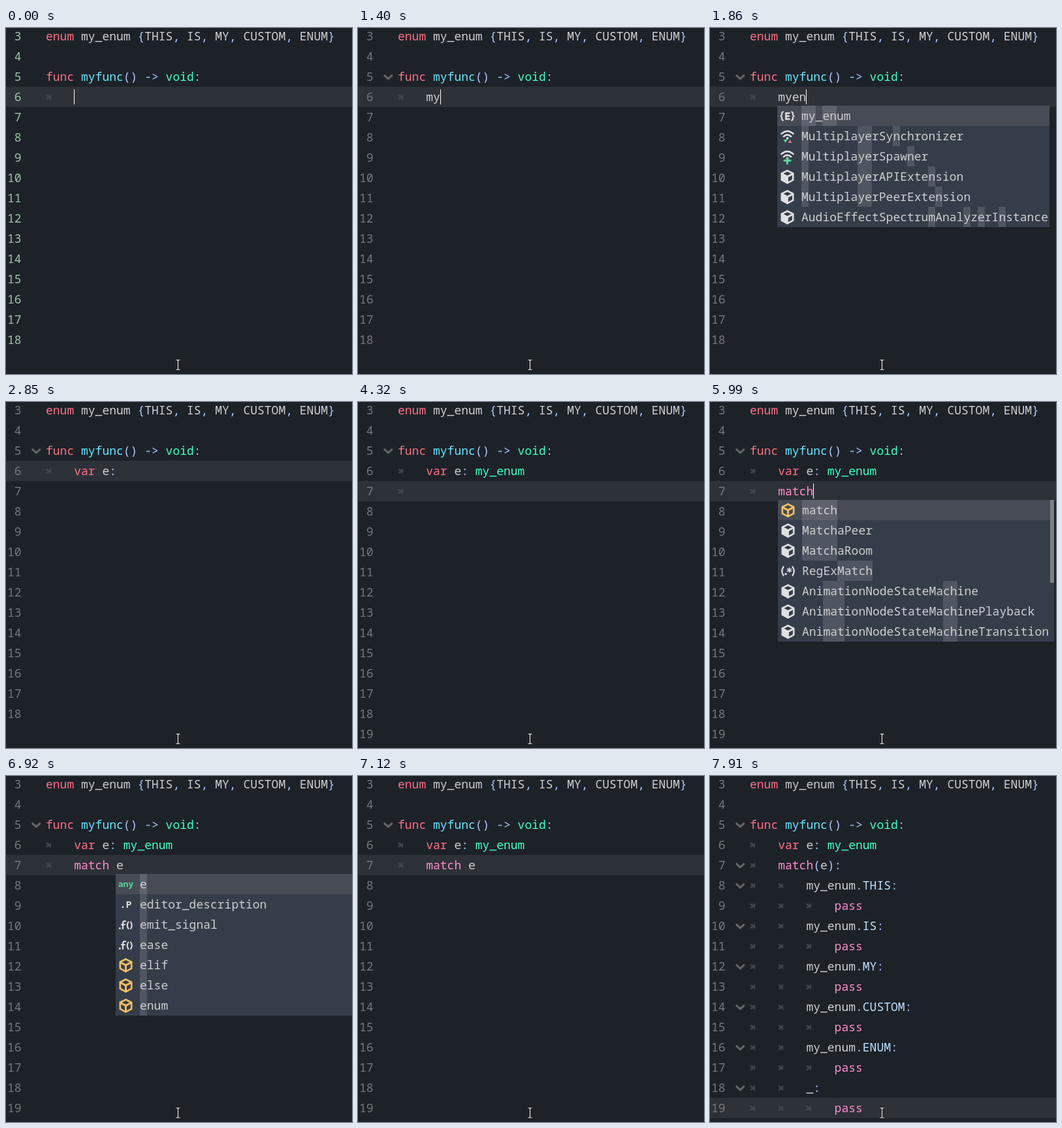
Write an HTML page with a canvas that moves like this. It is 530 px wide and 530 px high and loops after 8000 ms.

```html
<!DOCTYPE html>
<html lang="en">
<head>
<meta charset="utf-8">
<title>Code editor typing</title>
<style>
  html, body { margin: 0; width: 100%; height: 100%; overflow: hidden; background: #1d2229; }
  canvas { display: block; width: 530px; height: 530px; }
</style>
</head>
<body>
<canvas id="stage"></canvas>
<script>
const SIZE = 530, LOOP = 8000;
const CHAR = 10.8, ROW = 31, LEFT = 61, FIRST = 3;
const MONO = '"Noto Sans Mono", "DejaVu Sans Mono", monospace';
const C = {
  bg: '#1d2229', line: '#2d3138', text: '#cdcfd2', number: '#75787d', safe: '#a1c2a8',
  key: '#ff7085', flow: '#ff8ccc', func: '#66e6ff', type: '#42ffc2', symbol: '#abc9ff',
  member: '#bce0ff', tab: '#454950', fold: '#626569', list: '#363d4a', picked: '#464b56',
  match: 'rgba(255,255,255,.13)', bar: '#7b7f87', icon: '#e0e0e0', gold: '#f5c063',
  green: '#5fd79a', red: '#e0787e'
};
const WORDS = {
  enum: C.key, func: C.key, var: C.key, match: C.flow, pass: C.flow,
  myfunc: C.func, void: C.type
};

const HEAD = ['enum my_enum {THIS, IS, MY, CUSTOM, ENUM}', '', 'func myfunc() -> void:'];
const VAR = '\tvar e: my_enum';
const FULL = [VAR, '\tmatch(e):'];
for (const name of ['my_enum.THIS', 'my_enum.IS', 'my_enum.MY', 'my_enum.CUSTOM', 'my_enum.ENUM', '_'])
  FULL.push(`\t\t${name}:`, '\t\t\tpass');

// Completion lists: each item is "icon label".
const list = (x, y, width, typed, items, bar) => ({ x, y, width, typed, items: items.map(s => s.split(' ')), bar });
const MULTI = ['enum my_enum', 'sync MultiplayerSynchronizer', 'spawn MultiplayerSpawner',
  'cube MultiplayerAPIExtension', 'cube MultiplayerPeerExtension'];
const AUDIO = 'cube AudioEffectSpectrumAnalyzerInstance';
const MYE = [...MULTI, 'cube MultiplayerPeer', AUDIO];
const lists = {
  mye: list(103, 119, 427, 'mye', MYE),
  myen: list(103, 119, 417, 'myen', [...MULTI, AUDIO]),
  type: list(179, 119, 360, 'mye', MYE),
  match: list(104, 150, 423, 'match', ['box match', 'cube MatchaPeer', 'cube MatchaRoom', 'regex RegExMatch',
    'cube AnimationNodeStateMachine', 'cube AnimationNodeStateMachinePlayback',
    'cube AnimationNodeStateMachineTransition'], true),
  all: list(168, 150, 370, '', ['any e', 'prop auto_translate_mode', 'prop editor_description', 'prop multiplayer',
    'prop name', 'prop owner', 'prop physics_interpolation_mode']),
  e: list(168, 150, 370, 'e', ['any e', 'prop editor_description', 'call emit_signal', 'call ease',
    'box elif', 'box else', 'box enum'])
};

// [start ms, body lines, caret visible, open list]
const STEPS = [
  [0, ['\t'], 1],
  [540, ['\t'], 0],
  [1000, ['\tm'], 1],
  [1400, ['\tmy'], 1],
  [1730, ['\tmye'], 1, 'mye'],
  [1860, ['\tmyen'], 1, 'myen'],
  [2390, ['\tvar e: '], 1],
  [2850, ['\tvar e: '], 0],
  [3060, ['\tvar e: m'], 1],
  [3460, ['\tvar e: '], 1],
  [3720, ['\tvar e: m'], 1],
  [3850, ['\tvar e: my'], 1],
  [4250, ['\tvar e: mye'], 1, 'type'],
  [4320, [VAR, '\t'], 0],
  [4850, [VAR, '\t'], 1],
  [5200, [VAR, '\tm'], 1],
  [5270, [VAR, '\tma'], 1],
  [5470, [VAR, '\tmat'], 1],
  [5600, [VAR, '\tmatc'], 1],
  [5730, [VAR, '\tmatch'], 1],
  [5990, [VAR, '\tmatch'], 1, 'match'],
  [6250, [VAR, '\tmatch '], 1, 'all'],
  [6450, [VAR, '\tmatch e'], 1, 'e'],
  [6920, [VAR, '\tmatch e'], 0, 'e'],
  [7120, [VAR, '\tmatch e'], 0],
  [7390, FULL, 1],
  [7910, FULL, 0]
];
const SAFE_END = 540, FOLD_FUNC = 1130, FOLD_ALL = 7450, LINE_19 = 4320;

const canvas = document.getElementById('stage');
const ctx = canvas.getContext('2d');
const ratio = window.devicePixelRatio || 1;
canvas.width = canvas.height = SIZE * ratio;
ctx.scale(ratio, ratio);

const rowTop = i => i * ROW - 3;
const column = line => [...line].reduce((n, c) => n + (c === '\t' ? 4 : 1), 0);

function rect(x, y, w, h, color) {
  ctx.fillStyle = color;
  ctx.fillRect(x, y, w, h);
}

function text(str, x, y, color, font = '18px ' + MONO, align = 'left') {
  ctx.font = font;
  ctx.textAlign = align;
  ctx.fillStyle = color;
  ctx.fillText(str, x, y);
}

function stroke(d, color, width) {
  ctx.strokeStyle = color;
  ctx.lineWidth = width;
  ctx.stroke(new Path2D(d));
}

function fill(d, color) {
  ctx.fillStyle = color;
  ctx.fill(new Path2D(d), 'evenodd');
}

function at(x, y, draw) {
  ctx.save();
  ctx.translate(x, y);
  draw();
  ctx.restore();
}

function colorOf(word, before) {
  if (/^[^\w]/.test(word)) return C.symbol;
  if (before.endsWith('.')) return C.member;
  if (word === 'my_enum' && before.endsWith(': ')) return C.type;
  return WORDS[word] || C.text;
}

function codeLine(line, top) {
  for (const m of line.matchAll(/\t|\w+|[^\w\s]+/g)) {
    const before = line.slice(0, m.index);
    const x = LEFT + column(before) * CHAR;
    if (m[0] === '\t') at(Math.round(x), top + 16, tabMark);
    else text(m[0], x, top + 22, colorOf(m[0], before));
  }
}

function tabMark() {
  stroke('M.8 -3.4 L4.4 0 L.8 3.4', C.tab, 1.8);
  stroke('M7.4 -4 V4 M4 -3 L6.4 0 L4 3', C.tab, 1.3);
}

function foldArrow() {
  ctx.lineCap = ctx.lineJoin = 'round';
  stroke('M-5.4 -2.4 L0 2.6 L5.4 -2.4', C.fold, 3.2);
}

const HEX = 'M0 -11 L10 -6 V5.6 L0 11 L-10 5.6 V-6 Z';
const TOP_FACE = 'M0 -8 L6 -4.9 L0 -1.9 L-6 -4.9 Z';
const RIGHT_FACE = 'M7.4 -2.4 V4 L1.4 7.2 V.7 Z';
const LEFT_FACE = 'M-7.4 -2.4 V4 L-1.4 7.2 V.7 Z';

function glyph(str, color, size) {
  text(str, 0, size * .33, color, `bold ${size}px ${MONO}`, 'center');
}

function wifi() {
  ctx.lineCap = 'round';
  stroke('M-9 -4 Q0 -12 9 -4 M-5.6 .2 Q0 -5 5.6 .2', C.icon, 2.6);
  fill('M-2 3 a2 2 0 1 0 4 0 a2 2 0 1 0 -4 0', C.icon);
}

const ICONS = {
  cube: () => fill(HEX + TOP_FACE + RIGHT_FACE, C.icon),
  box: () => fill(HEX + TOP_FACE + RIGHT_FACE + LEFT_FACE, C.gold),
  enum() {
    ctx.lineCap = 'round';
    stroke('M-6.5 -6.5 Q-9 -6 -8.5 -2 L-10 0 L-8.5 2 Q-9 6 -6.5 6.5 M6.5 -6.5 Q9 -6 8.5 -2 L10 0 L8.5 2 Q9 6 6.5 6.5', C.icon, 2);
    stroke('M2.8 -4.6 H-2 V4.6 H2.8 M-2 0 H2.4', C.icon, 2.5);
  },
  sync() {
    wifi();
    fill('M-6 5 h6 l-3 5 Z', C.green);
    fill('M1 10 h6 l-3 -5 Z', C.red);
  },
  spawn() {
    wifi();
    stroke('M0 1.5 V10.5 M-4.5 6 H4.5', C.green, 3.2);
  },
  regex: () => glyph('(.*)', C.icon, 9.5 * 1.0),
  any: () => glyph('any', C.green, 13),
  prop: () => glyph('.P', C.icon, 15),
  call: () => glyph('.f()', C.icon, 10)
};
ICONS.regex = () => {
  ctx.lineCap = 'round';
  stroke('M-7 -6.5 Q-11.5 0 -7 6.5 M7 -6.5 Q11.5 0 7 6.5', C.icon, 2.2);
  fill('M-5 3 h3 v3 h-3 Z', C.icon);
  stroke('M2 -5 V2 M-1 -3.2 L5 .2 M5 -3.2 L-1 .2', C.icon, 1.6);
};
ICONS.call = () => {
  ctx.lineCap = 'round';
  fill('M-10.5 4 h2.6 v2.6 h-2.6 Z', C.icon);
  stroke('M-.5 -5.5 Q-4.5 -6.5 -4.5 -2 V6 M-6.5 -.5 H-1.5', C.icon, 2.2);
  stroke('M4 -4.5 Q.5 .5 4 6 M7.5 -4.5 Q11 .5 7.5 6', C.icon, 2);
};

// Positions of the typed letters, found left to right.
function matches(label, typed) {
  const low = label.toLowerCase();
  let from = 0;
  return [...typed].map(c => {
    const i = low.indexOf(c, from);
    if (i >= 0) from = i + 1;
    return i;
  }).filter(i => i >= 0);
}

function popup({ x, y, width, typed, items, bar }) {
  rect(x, y, width, items.length * ROW, C.list);
  rect(x, y, width, ROW, C.picked);
  items.forEach(([icon, label], i) => {
    const top = y + i * ROW, tx = x + 37;
    for (const k of matches(label, typed)) {
      const a = Math.round(tx + k * CHAR), b = Math.round(tx + (k + 1) * CHAR);
      rect(a, top, b - a, ROW, C.match);
    }
    at(x + 15.5, top + 16, ICONS[icon]);
    text(label, tx, top + 22, C.text);
  });
  if (bar) rect(x + width - 6, y, 6, 127, C.bar);
}

function pointer() {
  const beam = 'M-3 -7.5 H-1 L0 -6.5 L1 -7.5 H3 M0 -6.5 V6.5 M-3 7.5 H-1 L0 6.5 L1 7.5 H3';
  stroke(beam, '#14171b', 3);
  stroke(beam, '#f0f0f0', 1.2);
}

function draw(t) {
  const [, body, caret, open] = STEPS.findLast(s => s[0] <= t);
  const lines = [...HEAD, ...body];
  const last = lines.length - 1;
  const count = t < LINE_19 ? 16 : 17;

  rect(0, 0, SIZE, SIZE, C.bg);
  rect(0, rowTop(last), SIZE, ROW, C.line);
  for (let i = 0; i < count; i++)
    text(FIRST + i, 23.6, rowTop(i) + 22, t < SAFE_END ? C.safe : C.number, undefined, 'right');

  lines.forEach((line, i) => {
    const top = rowTop(i);
    const folds = line.endsWith(':') && t >= (i === 2 ? FOLD_FUNC : FOLD_ALL);
    if (folds) at(46.3, top + 16.2, foldArrow);
    codeLine(line, top);
  });

  if (caret) rect(Math.round(LEFT + column(lines[last]) * CHAR), rowTop(last) + 4, 1, 23, '#fff');
  if (open) popup(lists[open]);
  at(263.5, 516, pointer);
}

const start = performance.now();
function tick() {
  draw((performance.now() - start) % LOOP);
  requestAnimationFrame(tick);
}
tick();
</script>
</body>
</html>
```
